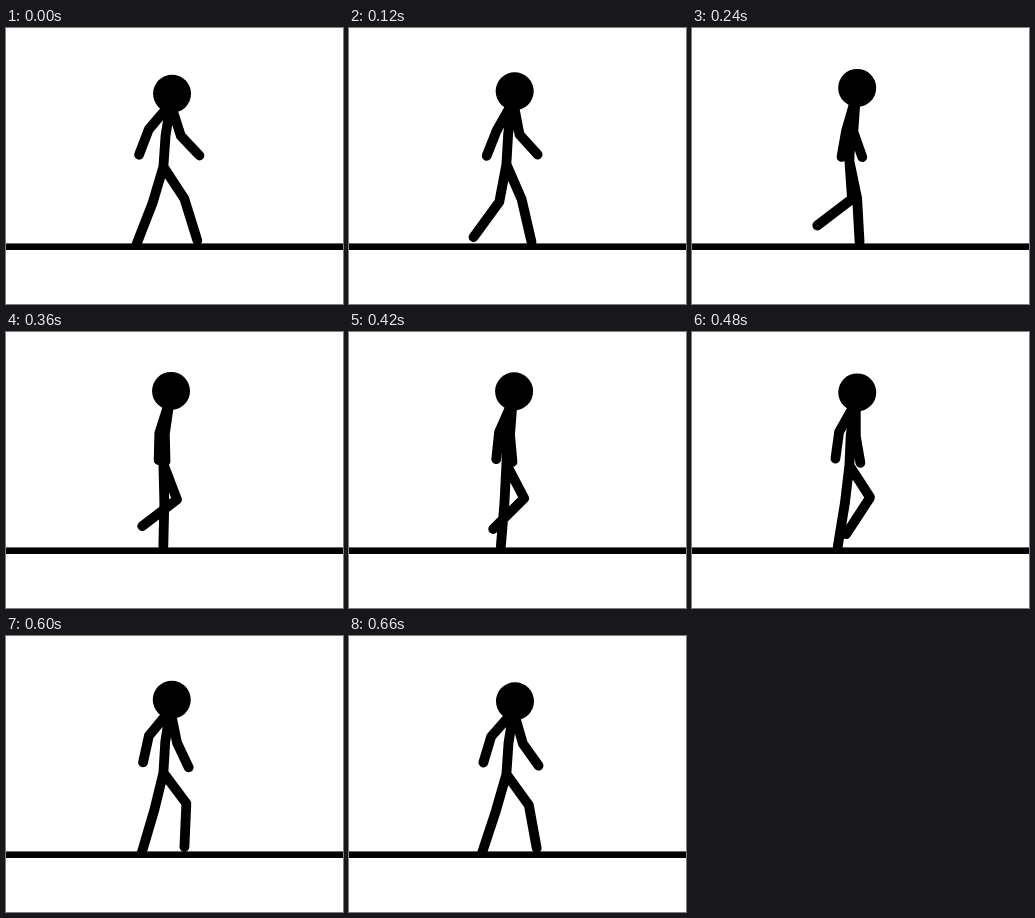
Write an HTML page that moves like this. It is 337 px wide and 276 px high and loops after 0.72 s.

```html
<!DOCTYPE html>
<html lang="en">
<head>
<meta charset="utf-8">
<title>Walking stick figure</title>
<style>
  html, body { margin: 0; width: 100%; height: 100%; overflow: hidden; background: #fff; }
  svg { display: block; width: 100vw; height: 100vh; }
  path { fill: none; stroke: #000; stroke-width: 9.8; stroke-linecap: round; stroke-linejoin: round; }
</style>
</head>
<body>
<svg viewBox="0 0 337 276">
  <rect y="215.4" width="337" height="6.6"/>
  <path id="limbs"/>
  <circle id="head" r="19"/>
</svg>
<script>
const STEP = 60, COUNT = 12;

// Each swing: mean, then [cos, sin] amplitudes of successive harmonics.
// Angles are in degrees from straight down, forwards positive.
const bob = [62, [3.4, -0.3], [0.3, 0]];
const arm = {
  upper: [-12, [-26.3, 5], [0.8, 2.6], [-2.7, 0.2]], upperLen: 33.8,
  lower: [5.6, [-29.3, -3.4], [5.6, 2.2], [-2.9, -4.8]], lowerLen: 27
};
const leg = {
  upper: [9.7, [-24.5, 9.2], [-1.4, -3], [-0.4, -0.5]], upperLen: 38.2,
  lower: [-16, [-18.2, -23], [12.5, -1.6], [-1.1, 2.7], [1.5, 0.4]], lowerLen: 43.7
};

function wave([mean, ...terms], phase) {
  return terms.reduce((sum, [c, s], i) => {
    const a = (i + 1) * phase;
    return sum + c * Math.cos(a) + s * Math.sin(a);
  }, mean);
}

function reach([x, y], len, deg) {
  const a = deg * Math.PI / 180;
  return [x + len * Math.sin(a), y + len * Math.cos(a)];
}

function limb(root, part, phase) {
  const mid = reach(root, part.upperLen, wave(part.upper, phase));
  const end = reach(mid, part.lowerLen, wave(part.lower, phase));
  return `M${root}L${mid} ${end}`;
}

const limbs = document.getElementById('limbs');
const head = document.getElementById('head');

// One loop is half a stride; the two sides are half a stride apart.
function draw(ms) {
  const phase = Math.PI * (Math.floor(ms / STEP) % COUNT) / COUNT;
  const other = phase + Math.PI;
  const y = wave(bob, 2 * phase), x = 165.5 + (y - 62) * 0.15;
  const shoulder = [x - 1.5, y + 10], hip = [157.4, y + 73];
  head.setAttribute('cx', x);
  head.setAttribute('cy', y);
  limbs.setAttribute('d', `M${shoulder}L${x - 6.5},${y + 42} ${hip}`
    + limb(shoulder, arm, phase) + limb(shoulder, arm, other)
    + limb(hip, leg, phase) + limb(hip, leg, other));
}

const start = performance.now();
function tick() {
  draw(performance.now() - start);
  requestAnimationFrame(tick);
}
tick();
</script>
</body>
</html>
```
